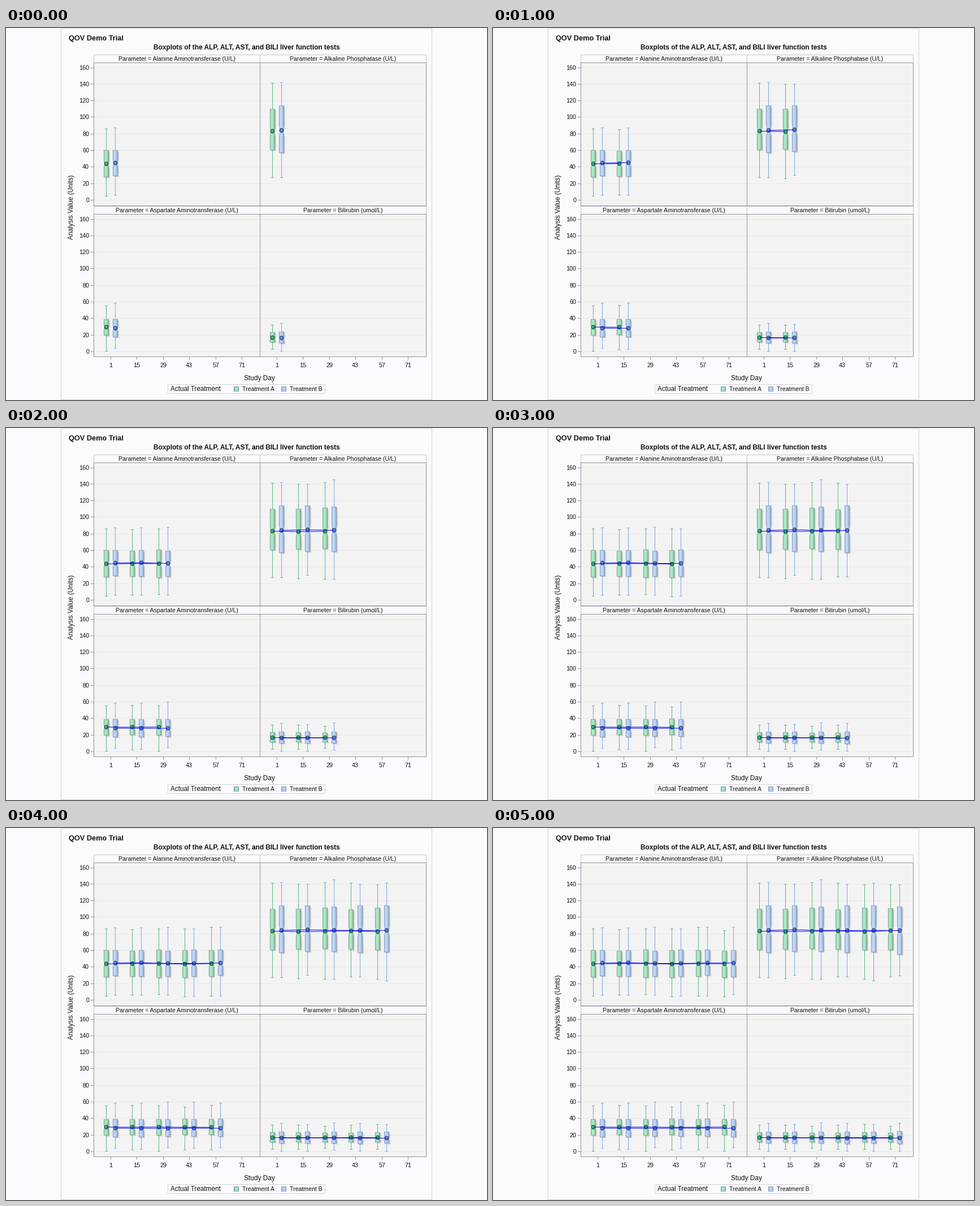
Animation, 851 px wide and 658 px high, one loop 6 s. Source, as a matplotlib script:

```python
import matplotlib.pyplot as plt
import numpy as np
from matplotlib.animation import FuncAnimation
from matplotlib.colors import LinearSegmentedColormap
from matplotlib.patches import Circle, Polygon, Rectangle

W, H, DPI = 851, 658, 100
PX = 72 / DPI
DAYS = range(1, 72, 14)
STEP = 46.45        # pixels between study days
UNIT = 1.4656       # pixels per analysis unit
PANEL_W, PANEL_H = 294, 268
LEFT, TOP = 155.5, 61.5

PAGE, PLOT, GRID = "#fafaff", "#f3f3f3", "#e9e9e9"
FRAME, EDGE, CELL = "#949494", "#d2d2d6", "#c6c6ca"
LINK = "#1414f0"

# visit-to-visit spread of low, q1, mean, q3, high as a share of the box height
SPREAD = np.array([0.07, 0.03, 0.015, 0.03, 0.06])
rng = np.random.default_rng(7)


def ramp(dark, mid, light, right):
    stops = [(0, dark), (0.16, mid), (0.42, light), (0.68, mid), (1, right)]
    return LinearSegmentedColormap.from_list("ramp", stops)


STYLES = {
    "A": dict(dx=22, line="#58b886", edge="#7fa892", dot="#22b573", rim="#0c4a30",
              cmap=ramp("#7fb698", "#9fdcb9", "#b2efcb", "#75a48a")),
    "B": dict(dx=38, line="#7fa5e2", edge="#8c9fbe", dot="#4f88dc", rim="#17346c",
              cmap=ramp("#94add2", "#b0ccf0", "#c3dcfb", "#8498b8")),
}

plt.rcParams.update({"font.family": "Liberation Sans", "path.snap": False})
fig = plt.figure(figsize=(W / DPI, H / DPI), dpi=DPI, facecolor=PAGE)
ax = fig.add_axes([0, 0, 1, 1])
ax.set(xlim=(0, W), ylim=(H, 0))
ax.autoscale(False)
ax.axis("off")

day_parts = [[] for _ in DAYS]
links = []


def pixel(v):
    """Centre of the pixel that holds v."""
    return np.floor(v) + 0.5


def text(x, y, s, px, ha="center", va="baseline", **kw):
    ax.text(x, y, s, fontsize=px * PX, ha=ha, va=va, color="#111111", **kw)


def line(xs, ys, color, width=1.0, z=2):
    return ax.plot(xs, ys, color=color, lw=width * PX, zorder=z,
                   solid_capstyle="butt")[0]


def rect(x, y, w, h, face, edge, z=1):
    ax.add_patch(Rectangle((x, y), w, h, fc=face, ec=edge, lw=PX, zorder=z))


def shade(x0, x1, y0, y1, cmap, z):
    return ax.imshow(np.linspace(0, 1, 48)[None, :], extent=(x0, x1, y1, y0),
                     cmap=cmap, aspect="auto", zorder=z, interpolation="bilinear")


def notched(x, top, mid, bottom, half=4.2, waist=2.2):
    """Corner points of a box pinched around its median."""
    reach = 0.125 * (bottom - top)
    side = [(half, top), (half, mid - reach), (waist, mid),
            (half, mid + reach), (half, bottom)]
    right = [(x + w, y) for w, y in side]
    left = [(x - w, y) for w, y in reversed(side)]
    return np.array(right + left)


def visits(first):
    """Five statistics per day: the first visit, then small seeded changes."""
    first = np.array(first, float)
    rows = np.tile(first, (len(DAYS), 1))
    rows[1:] += rng.uniform(-1, 1, rows[1:].shape) * SPREAD * (first[3] - first[1])
    rows[:, [0, 4]] = np.maximum(np.round(rows[:, [0, 4]]), 1)
    return rows


def box(x, zero, stats, st):
    x = pixel(x)
    low, q1, mean, q3, high = zero - UNIT * stats
    q1, q3 = pixel(q1), pixel(q3)
    parts = []

    # whiskers with caps
    for tip, base in ((low, q1), (high, q3)):
        tip = pixel(tip)
        parts.append(line([x, x], [tip, base], st["line"], z=3))
        parts.append(line([x - 2.5, x + 2.5], [tip, tip], st["line"], z=3))

    # soft shadow, then the shaded body
    shape = notched(x, q3, mean + 0.7, q1)
    for off, alpha in ((2.6, 0.07), (1.9, 0.10), (1.2, 0.14)):
        parts.append(ax.add_patch(Polygon(shape + off, fc="#505050", ec="none",
                                          alpha=alpha, zorder=3.5)))
    body = ax.add_patch(Polygon(shape, fc="none", ec=st["edge"], lw=0.9 * PX, zorder=5))
    fill = shade(x - 4.2, x + 4.2, q3, q1, st["cmap"], 4)
    fill.set_clip_path(Polygon(shape).get_path(), ax.transData)

    # mean marker with a small highlight
    dot = ax.add_patch(Circle((x, mean), 3.3, fc=st["dot"], ec=st["rim"],
                              lw=1.1 * PX, zorder=6))
    glint = ax.add_patch(Circle((x - 0.7, mean - 0.8), 1.2, fc="white", ec="none",
                                alpha=0.3, zorder=6.1))
    return parts + [body, fill, dot, glint], (x, mean)


def panel(col, row, name, **groups):
    x0, y0 = LEFT + PANEL_W * col, TOP + PANEL_H * row
    zero, height = y0 + 243, 253 - row
    rect(x0, y0 - 14, PANEL_W, 14, PAGE, CELL)
    text(x0 + PANEL_W / 2, y0 - 3.2, "Parameter = " + name, 10.5)
    rect(x0, y0, PANEL_W, height, PLOT, "none", 0.5)

    for v in range(0, 161, 20):
        y = pixel(zero - UNIT * v)
        line([x0, x0 + PANEL_W], [y, y], GRID, z=1.2)
        if col == 0:
            line([x0 - 5.5, x0], [y, y], FRAME)
            text(x0 - 8.5, y + 3.8, str(v), 10.7, "right")
    rect(x0, y0, PANEL_W, height, "none", FRAME, 2.5)
    if row == 1:
        for k, day in enumerate(DAYS):
            x = pixel(x0 + 29.8 + STEP * k)
            line([x, x], [y0 + height, y0 + height + 5], FRAME)
            text(x - 0.3, 600.3, str(day), 10.7)

    for key, first in groups.items():
        st, path = STYLES[key], []
        for k, stats in enumerate(visits(first)):
            parts, dot = box(x0 + st["dx"] + STEP * k, zero, stats, st)
            day_parts[k] += parts
            path.append(dot)
        links.append((line([], [], LINK, 1.1, 7), np.array(path)))


# outer frame and titles
rect(97.5, 0.5, 656, 657, PAGE, EDGE, 0)
text(111, 22.3, "QOV Demo Trial", 12.8, "left", weight="bold")
text(425.5, 37.9, "Boxplots of the ALP, ALT, AST, and BILI liver function tests",
     11.92, weight="bold")
text(116, 316.3, "Analysis Value (Units)", 11.7, va="center", rotation=90)
text(448.7, 623.3, "Study Day", 11.85)

# first visit: low, lower quartile, mean, upper quartile, high
panel(0, 0, "Alanine Aminotransferase (U/L)",
      A=(5, 28, 43.8, 60, 86), B=(6, 29, 44.8, 60, 87))
panel(1, 0, "Alkaline Phosphatase (U/L)",
      A=(27, 61, 83.3, 110, 141), B=(27, 57, 84.2, 114, 142))
panel(0, 1, "Aspartate Aminotransferase (U/L)",
      A=(1, 20, 29.6, 39, 55), B=(4, 18, 28.3, 39, 59))
panel(1, 1, "Bilirubin (umol/L)",
      A=(3, 11.5, 16.9, 23, 32), B=(1, 10, 16.5, 24, 34))

# legend
rect(286.5, 630.5, 278, 16, PAGE, EDGE)
text(291, 642.5, "Actual Treatment", 11.8, "left")
for key, x in (("A", 403.5), ("B", 487.5)):
    shade(x, x + 8, 634.5, 642.5, STYLES[key]["cmap"], 2)
    rect(x, 634.5, 8, 8, "none", STYLES[key]["edge"], 3)
    text(x + 14.3, 642.1, "Treatment " + key, 10.45, "left")

ax.set(xlim=(0, W), ylim=(H, 0))


def update(k):
    for day, parts in enumerate(day_parts):
        for part in parts:
            part.set_visible(day <= k)
    for link, path in links:
        shown = path[:k + 1] if k else path[:0]
        link.set_data(shown[:, 0], shown[:, 1])
    return []


anim = FuncAnimation(fig, update, frames=len(DAYS), interval=1000,
                     repeat=True, repeat_delay=0, blit=False)
plt.show()
```
